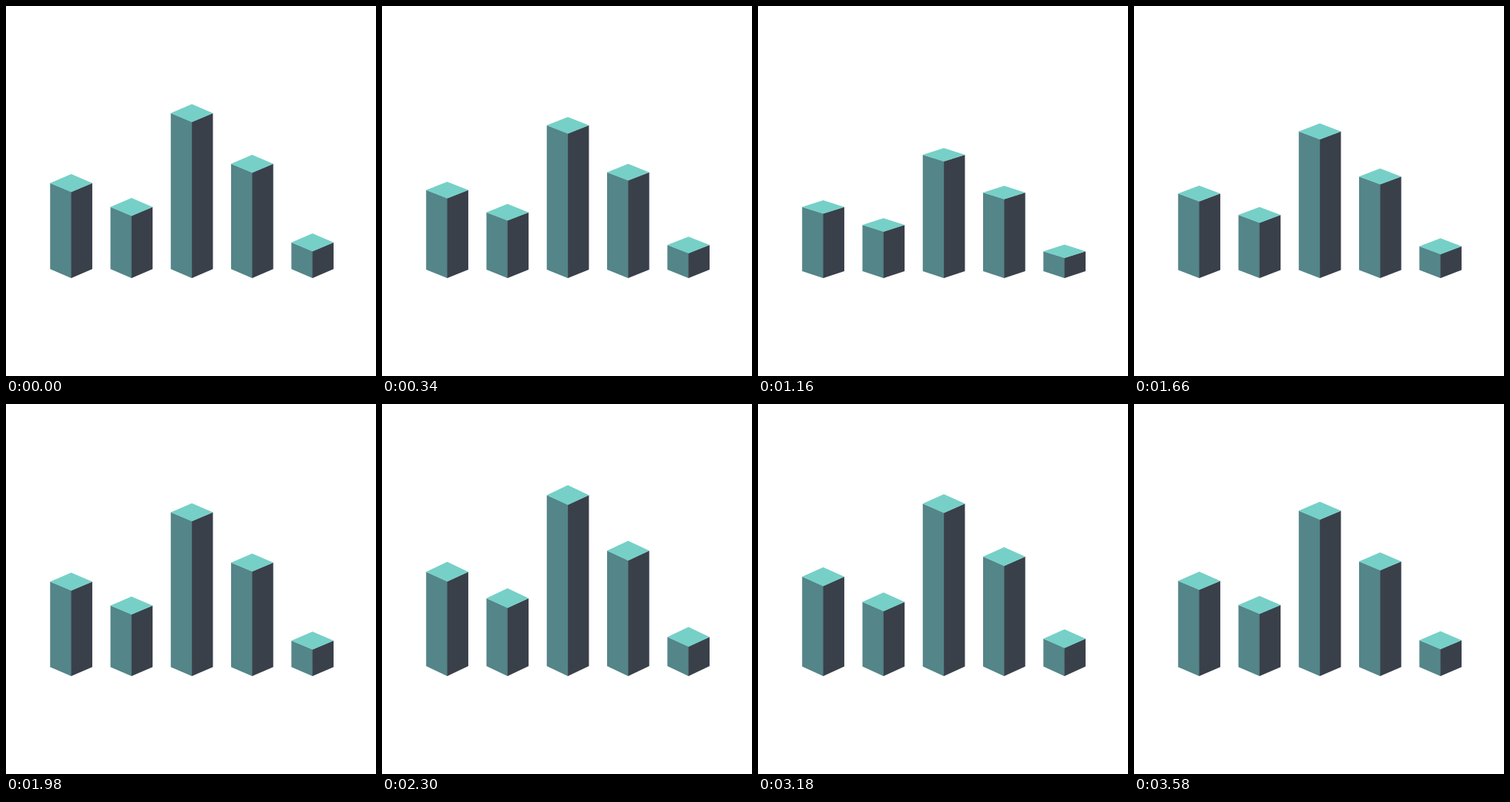
Animation, 480 px wide and 480 px high, one loop 3.6 s. Source, as an HTML page with a canvas:

```html
<!DOCTYPE html>
<html lang="en">
<head>
<meta charset="utf-8">
<title>Isometric bars</title>
<style>
html, body { margin: 0; width: 100%; height: 100%; overflow: hidden; background: #fff; }
canvas { display: block; }
</style>
</head>
<body>
<canvas width="480" height="480"></canvas>
<script>
const ctx = document.querySelector('canvas').getContext('2d');
const LOOP = 3600, BASE = 352.9;
const HALF = 27.35, DEPTH = 11.75, PITCH = 78.25, FIRST = 84.6;
const heights = [135, 103.8, 225.7, 160, 58];
const scales = [1, 0.739, 1.129, 1];

function face(color, ...points) {
  ctx.fillStyle = color;
  ctx.beginPath();
  for (const [x, y] of points) ctx.lineTo(x, y);
  ctx.fill();
}

// Drawn upwards from the ground; sides tuck slightly under their neighbours to hide seams.
function bar(x, height) {
  const l = x - HALF, r = x + HALF;
  const back = -height, side = back + DEPTH, front = side + DEPTH;
  face('#548588', [l, side], [x + 0.5, front - 0.5], [x + 0.5, 0], [x, 0], [l, -DEPTH]);
  face('#3a404a', [x, front - 0.5], [r, side], [r, -DEPTH], [x, 0]);
  face('#76d0c8', [x, back], [r, side], [x, front], [l, side]);
}

function draw() {
  const phase = performance.now() % LOOP / LOOP * 3;
  const i = Math.floor(phase);
  const scale = scales[i] + (scales[i + 1] - scales[i]) * (phase - i);
  ctx.setTransform(1, 0, 0, 1, 0, 0);
  ctx.fillStyle = '#fff';
  ctx.fillRect(0, 0, 480, 480);
  ctx.setTransform(1, 0, 0, scale, 0, BASE);
  heights.forEach((height, n) => bar(FIRST + n * PITCH, height));
  requestAnimationFrame(draw);
}
draw();
</script>
</body>
</html>
```
